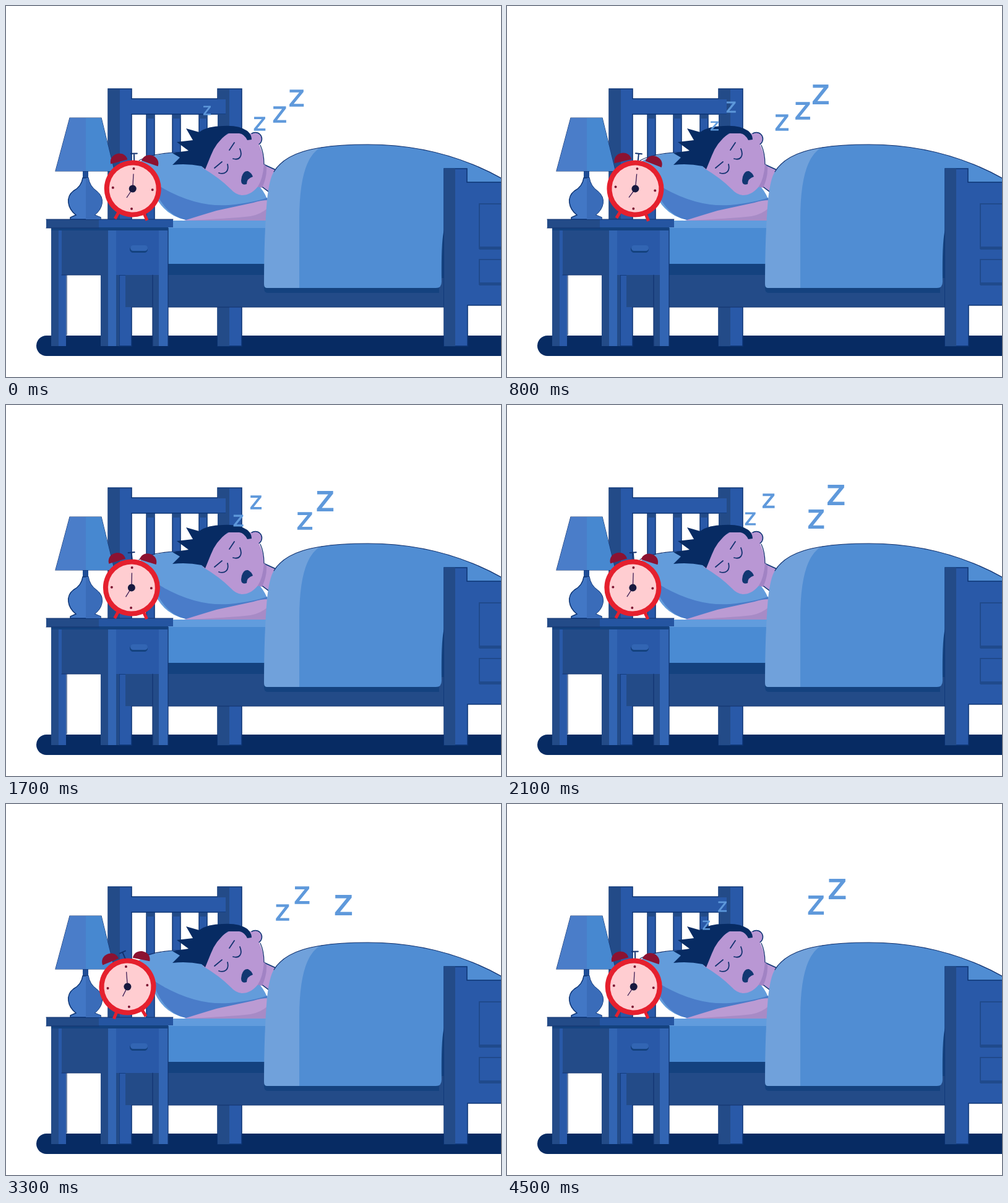
Animation of 800 by 600 pixels, one loop 4600 ms. Source, as an HTML page:

```html
<!DOCTYPE html>
<html lang="en">
<head>
<meta charset="utf-8">
<title>Sleeping in</title>
<style>
  html, body { margin: 0; width: 100%; height: 100%; overflow: hidden; background: #fff; }
  svg { display: block; width: 800px; height: 600px; }
  .navy { fill: #072b63; }
  .deep { fill: #14427f; }
  .dark { fill: #234b88; }
  .mid { fill: #2959a8; }
  .lit { fill: #3265b3; }
  .edge { stroke: #0d3474; stroke-width: 1.5; }
  .line { fill: none; stroke: #12326f; stroke-width: 1.2; stroke-linecap: round; }
  .zzz { fill: #5f99db; stroke: #5f99db; stroke-width: .045em; text-anchor: middle; font-family: "DejaVu Sans", sans-serif; }
</style>
</head>
<body>
<svg viewBox="0 0 800 600">
  <rect class="navy" x="49" y="533" width="800" height="33" rx="16.5"/>

  <!-- headboard -->
  <g class="mid edge">
    <path d="M165 134h38v16h139v-16h39v130H355V175H203v175H165z"/>
    <path d="M227 175h13v172h-13zM269 175h13v80h-13zM312 175h13v60h-13z"/>
  </g>
  <path class="dark" d="M165 135h19v215h-19zM342 135h19v129h-6V151h-13zM342 175h13v90h-13zM227 176h13v6h-13zM269 176h13v6h-13zM312 176h13v6h-13z"/>

  <!-- bed legs and base -->
  <path class="mid edge" d="M183 435h20v115h-20zM342 480h39v70h-39z"/>
  <path class="dark" d="M342 487h19v63h-19zM193 434h515v53H193z"/>
  <path class="line" d="M203 487H708"/>
  <path class="deep" d="M262 417h446v18H193v-18z"/>

  <!-- pillow and mattress -->
  <path fill="#639cdb" d="M208 258Q232 236 296 236L345 240Q410 280 422 312L417 346H291Q253 338 238 300Q222 280 208 258z"/>
  <path fill="#4a7cc9" d="M236 284Q300 326 360 322Q400 318 422 310V346H291Q253 338 236 284z"/>
  <path class="line" d="M215 250Q240 236 296 236"/>
  <path fill="#4a8bd3" d="M262 347h158v70H262z"/>
  <path fill="#619cdd" d="M262 347h158v12H262z"/>

  <!-- sleeper -->
  <path fill="#bb9bd3" d="M288 347Q310 340 340 331L400 318Q412 314 424 314V347z"/>
  <path fill="#a78bc6" d="M290 347Q360 344 395 340Q412 337 424 326V347z"/>
  <path fill="#b997d4" class="edge" d="M414 255L438 266L424 300L408 288z"/>
  <path fill="#a183c4" d="M415 253L421 260Q422 276 414 294L404 292z"/>
  <circle class="edge" fill="#b997d4" cx="403" cy="215" r="10.5"/>
  <path fill="#b997d4" d="M318 260L340 218L370 200L398 207Q417 232 417 256Q415 280 407 292Q396 306 381 306Q371 305 363 296Q345 278 318 262z"/>
  <path class="line" d="M411 225Q417 238 417 256"/>
  <path class="navy" d="M316 259Q292 254 269 257L281 245L269 238L295 234L276 220L302 217L291 198L312 204Q326 194 350 194Q376 192 390 202Q397 208 397 216L390 217Q385 207 377 206L358 206Q338 222 331 242L322 264z"/>
  <path class="line" style="stroke-width:1.8" d="M337 262L349 252M361 233L369 221M344 270C353 273 361 268 358 256M367 247C377 250 383 243 378 231"/>
  <path fill="#123772" d="M381 276Q384 266 391 267Q397 270 399 276Q389 279 389 288Q380 291 380 282z"/>

  <!-- blanket -->
  <path class="deep" d="M417 440H708V360H700V464H423Q417 464 417 456z"/>
  <path fill="#70a1db" d="M417 450Q417 370 422 312Q426 278 433 268C450 240 490 224 585 224V456H422Q417 456 417 450z"/>
  <path fill="#508dd3" d="M508 229Q540 224 585 224Q705 224 805 281V290H745L708 362Q703 380 704 446Q704 456 695 456H474V345Q474 248 508 229z"/>
  <path class="line" d="M433 268C450 240 490 224 585 224Q705 224 805 281"/>

  <!-- footboard -->
  <path class="mid edge" d="M708 263h37v22h60v199h-59v66h-38z"/>
  <path class="dark" d="M708 263h18v287h-18z"/>
  <path fill="none" stroke="#204a8c" stroke-width="2" d="M805 320h-40v72h40M805 410h-40v40h40"/>
  <path fill="#204a8c" d="M765 389h40v5h-40zM765 447h40v5h-40z"/>

  <!-- nightstand -->
  <path class="dark" d="M73 359h12v191H73zM90 359h64v76H90zM153 359h12v191h-12zM237 435h12v115h-12z"/>
  <path class="mid" d="M85 359h5v76h7v115H85zM178 359h70v76h-70z"/>
  <path class="dark" d="M178 435h5v115h-5z"/>
  <path class="lit" d="M165 359h13v191h-13zM247 359h15v191h-15z"/>
  <path class="line" d="M98 435V532M237 435V550M262 359V550M90 435H153"/>
  <path class="deep" d="M73 358h189v5H73z"/>
  <path class="dark" d="M65 345h85v14H65z"/>
  <path fill="#2555a1" d="M150 345h120v13H150z"/>
  <path class="line" d="M65 345H270M65 359H150"/>
  <rect class="deep" x="200" y="388" width="29" height="11" rx="5.5"/>
  <rect class="lit" x="201" y="387" width="28" height="9" rx="4.5"/>

  <!-- lamp -->
  <path fill="#1f4d96" d="M124 266h9v16h-9z"/>
  <path class="edge" fill="#4277c5" d="M124 278Q122 292 109 299C96 309 99 327 113 338L104 342V345H153V342L143 338C157 327 160 311 147 300Q135 292 133 278z"/>
  <path fill="#3a6cb9" d="M129 278H133Q135 292 147 300C160 311 157 327 143 338L153 342V345H129z"/>
  <path class="line" d="M103 181H154L175 267H80z"/>
  <path fill="#4a7dc9" d="M103 181H129V267H80z"/>
  <path fill="#4788d0" d="M129 181H154L175 267H129z"/>

  <!-- alarm clock -->
  <g id="clock">
    <path id="knob" class="line" style="stroke-width:2" d="M0-45V-57M-5-57H5"/>
    <path fill="none" stroke="#e5202e" stroke-width="5" d="M-20 38L-26 50M20 38L26 50"/>
    <g fill="#8c1231">
      <path d="M-14 6C-14-12 14-12 14 6z" transform="translate(-26-48) rotate(-18)"/>
      <path d="M-14 6C-14-12 14-12 14 6z" transform="translate(27-48) rotate(16)"/>
    </g>
    <circle r="46" fill="#e5202e"/>
    <circle r="38" fill="#ffcdd1"/>
    <g fill="#7d1432">
      <circle cy="-32.5" r="2"/><circle cy="32.5" r="2"/>
      <circle cx="-32" r="2"/><circle cx="32" r="2"/>
    </g>
    <path fill="none" stroke="#3b1f55" stroke-width="1.3" d="M0 0V-24M0 0L-9 15"/>
    <circle r="6" fill="#17193f"/>
  </g>

  <g id="snores"></g>
</svg>
<script>
const LOOP = 4.6, STEP = 0.1, SHAKE = 0.71;
const clock = document.getElementById("clock");
const knob = document.getElementById("knob");
const layer = document.getElementById("snores");

// Each stream drifts steadily, then bends upwards after `bend` seconds.
const streams = [
  { x: 325, y: 168, speed: 46.5, rise: 6.7, bend: 4, life: 4.65, births: [-3.11, 0, 4] },
  { x: 322, y: 195, speed: 44.6, rise: 7.5, bend: 3.3, life: 5.3, births: [-2.7, 0.5, 4.5] },
  { x: 410, y: 189, speed: 43, rise: 1.5, bend: 1.5, life: 3.4, births: [0] },
];

const snores = streams.flatMap(stream => stream.births.map(birth => {
  const node = document.createElementNS("http://www.w3.org/2000/svg", "text");
  node.setAttribute("class", "zzz");
  node.textContent = "Z";
  layer.append(node);
  return { ...stream, birth, node };
}));

function setAll(node, attributes) {
  for (const name in attributes) node.setAttribute(name, attributes[name]);
}

function drawSnore(s, t) {
  const age = t - s.birth, slack = STEP / 10;
  const shown = age > -slack && age < s.life + slack;
  const lift = Math.max(0, age - s.bend) ** 2;
  const x = s.x + s.speed * age - 2 * lift;
  const y = s.y - s.rise * age - 6.7 * lift;
  const height = Math.max(1, Math.min(33, 14.6 + (x - 325) * 0.092));
  setAll(s.node, {
    visibility: shown ? "visible" : "hidden",
    x, y: y + height * 0.48 + 1.2,
    "font-size": height / 0.77,
    opacity: age > s.life - STEP + slack ? 0.55 : 1,
  });
}

function drawClock(t) {
  const swing = Math.cos(2 * Math.PI * (t - 0.12) / SHAKE);
  setAll(clock, { transform: `translate(${202 + 5.6 * swing} 295.5) rotate(${0.6 + 5 * swing})` });
  setAll(knob, { transform: `rotate(${-9 + 10 * swing} 0 -45)` });
}

function draw() {
  const t = Math.floor(performance.now() / 1000 % LOOP / STEP) * STEP;
  snores.forEach(s => drawSnore(s, t));
  drawClock(t);
  requestAnimationFrame(draw);
}
draw();
</script>
</body>
</html>
```
